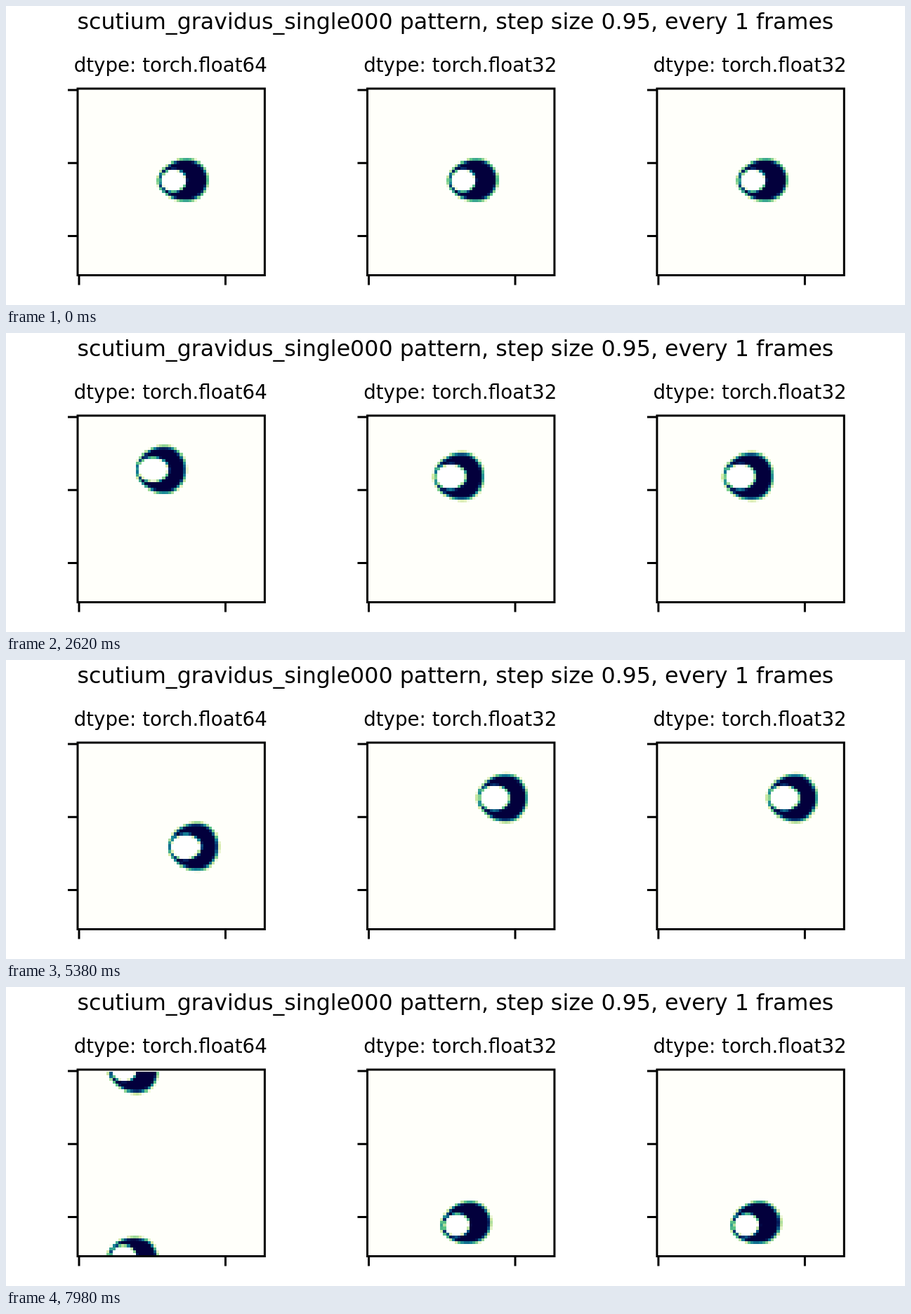
An HTML page with a canvas for the animation above (8000 ms loop, 1280 by 427 pixels).

```html
<!DOCTYPE html>
<html lang="en">
<head>
<meta charset="utf-8">
<title>Glider precision comparison</title>
<style>
html, body { margin: 0; width: 100%; height: 100%; overflow: hidden; background: #fff; }
canvas, svg { position: absolute; left: 0; top: 0; }
text { font-family: "DejaVu Sans", sans-serif; text-anchor: middle; }
</style>
</head>
<body>
<canvas id="field" width="1280" height="427"></canvas>
<svg id="chart" width="1280" height="427"></svg>
<script>
const ctx = document.getElementById("field").getContext("2d");
const SIZE = 64, CELL = 4.17, TOP = 117.2, STEP = 20, STEPS = 400, SPEED = 2.4;

// x is steady travel plus a small drift; y bends through evenly spaced heights (in cells).
const single = {
  drift: u => 5.2 * Math.sin(Math.PI * u ** 2.7),
  heights: [31.5, 27.2, 23.3, 19.8, 18.2, 18.4, 19.3, 9.8, -11.9]
};
const double = {
  drift: u => -2 * (1 - Math.exp(-10 * u)) - 13.3 * u ** 18,
  heights: [31.5, 26.5, 19, 20, 27.9, 36, 34.9, 44.8, 65.4]
};
const panels = [
  { left: 101.5, track: double, label: "dtype: torch.float64" },
  { left: 514, track: single, label: "dtype: torch.float32" },
  { left: 926.4, track: single, label: "dtype: torch.float32" }
];

// Colour ramp from empty to full
const ramp = ["#fffffa", "#d4eaa6", "#5cc487", "#148298", "#05306f", "#03003c"]
  .map(hex => [1, 3, 5].map(k => parseInt(hex.slice(k, k + 2), 16)));

const clamp = v => Math.max(0, Math.min(1, v));

function colour(v) {
  const p = v * (ramp.length - 1), i = Math.min(ramp.length - 2, Math.floor(p));
  return `rgb(${ramp[i].map((c, k) => Math.round(c + (ramp[i + 1][k] - c) * (p - i)))})`;
}

// Smooth curve through evenly spaced values, u from 0 to 1
function along(values, u) {
  const last = values.length - 1, i = Math.min(last - 1, Math.floor(u * last));
  const f = u * last - i, g = 1 - f;
  const slope = k => {
    const a = Math.max(0, k - 1), b = Math.min(last, k + 1);
    return (values[b] - values[a]) / (b - a);
  };
  return values[i] * g * g * (1 + 2 * f) + values[i + 1] * f * f * (3 - 2 * f)
    + f * g * (slope(i) * g - slope(i + 1) * f);
}

// An egg with its blunt end to the right and a hole behind the middle
function glider(x, y, swell) {
  const bend = x < 0 ? 1.85 : 2;
  const r = (Math.abs(x / (x < 0 ? 10.5 : 7.7)) ** bend
    + Math.abs(y / (7.8 + 1.1 * swell)) ** bend) ** (1 / bend);
  const right = -0.6 + 1.6 * swell, back = -8.8 - 0.4 * swell;
  const h = Math.hypot((2 * x - right - back) / (right - back), y / (3.7 + 0.4 * swell));
  const rim = clamp((1 - r) * (4.8 - 0.3 * Math.min(0, x)));
  return { hole: h < 1, value: Math.min(rim, clamp((h - 1) * 4 + 0.3)) };
}

function drawPanel({ left, track }, n) {
  ctx.fillStyle = colour(0);
  ctx.fillRect(left, 118, 267, 267);
  const u = n / STEPS;
  const cx = 37.5 + SPEED * n + track.drift(u), cy = along(track.heights, u);
  const rise = (along(track.heights, u + 0.002) - cy) / (0.002 * STEPS);
  const angle = Math.atan2(rise, SPEED), c = Math.cos(angle), s = Math.sin(angle);
  const swell = Math.sqrt(Math.sin(Math.PI * u));
  const wrap = k => (k % SIZE + SIZE) % SIZE;
  const edge = (from, k) => Math.round(from + k * CELL);

  for (let j = Math.floor(cy) - 11; j <= cy + 11; j++) {
    const row = wrap(j);
    if (!row) continue;
    for (let i = Math.floor(cx) - 12; i <= cx + 12; i++) {
      const dx = i + 0.5 - cx, dy = j + 0.5 - cy;
      const { hole, value } = glider(dx * c + dy * s, dy * c - dx * s, swell);
      if (value < 0.03 && !hole) continue;
      const col = wrap(i), x = edge(left, col), y = edge(TOP, row);
      ctx.fillStyle = value < 0.03 ? "#fff" : colour(value);
      ctx.fillRect(x, y, edge(left, col + 1) - x, edge(TOP, row + 1) - y);
    }
  }
}

function chart() {
  let out = `<text x="640" y="32.8" font-size="31.7">scutium_gravidus_single000 pattern, step size 0.95, every 1 frames</text>`;
  for (const { left, label } of panels) {
    const x = left + 0.5;
    out += `<text x="${x + 132.2}" y="94" font-size="27.7">${label}</text>
      <path fill="none" stroke="#000" stroke-width="3" d="M${x} 118h266.4v266.6h-266.4z
        M${x} 120h-14M${x} 224.2h-14M${x} 328.5h-14M${x + 2} 384.6v14M${x + 210.5} 384.6v14"/>`;
  }
  document.getElementById("chart").innerHTML = out;
}

function frame() {
  const n = Math.floor(performance.now() / STEP) % STEPS;
  ctx.clearRect(0, 0, 1280, 427);
  panels.forEach(p => drawPanel(p, n));
  requestAnimationFrame(frame);
}

chart();
frame();
</script>
</body>
</html>
```
